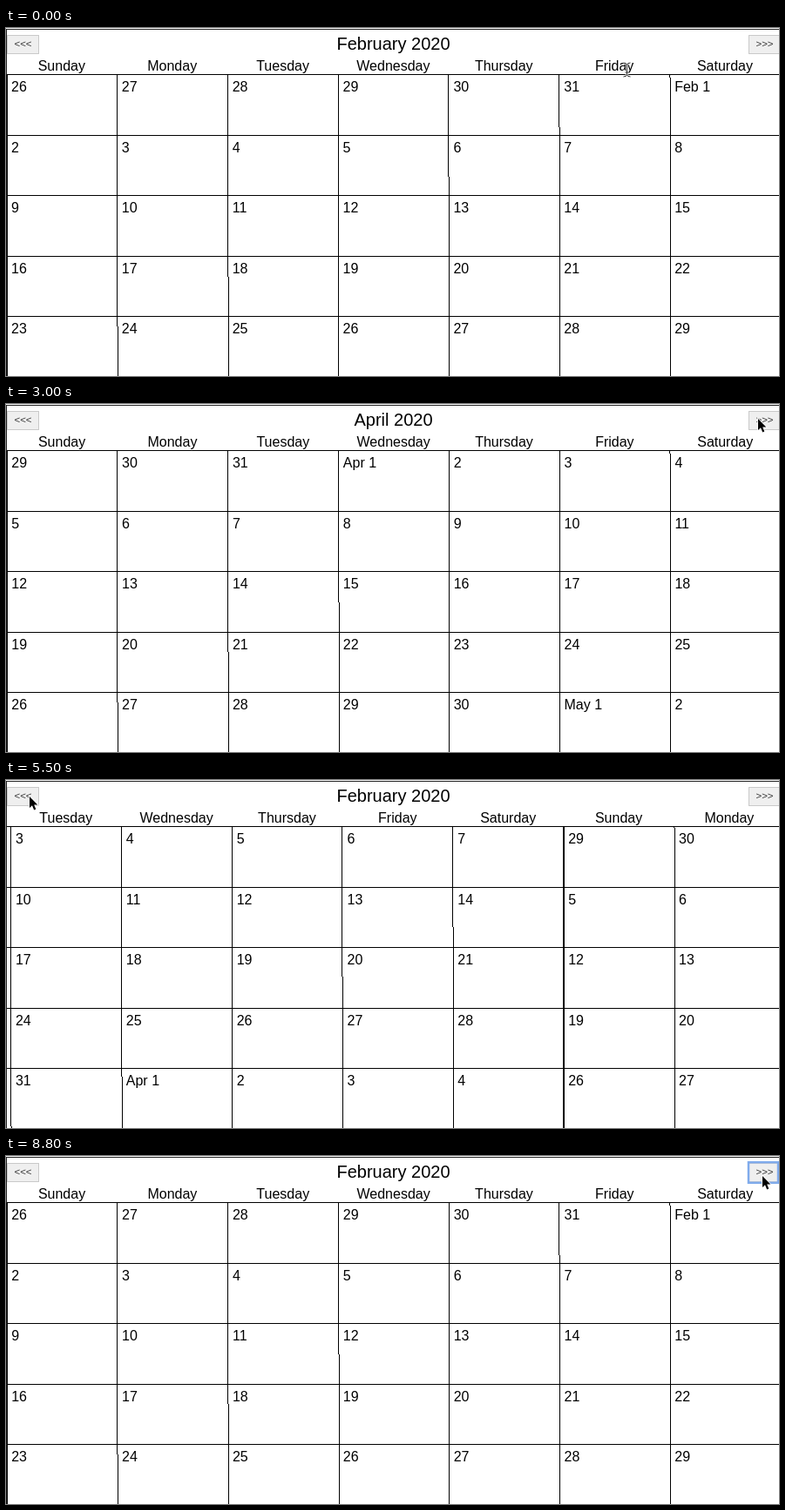
These frames come from a looping animation (887 by 400 pixels, 8900 ms). An HTML page with a canvas:

```html
<!DOCTYPE html>
<html lang="en">
<head>
<meta charset="utf-8">
<title>Sliding calendar</title>
<style>
  html, body { margin: 0; width: 100%; height: 100%; overflow: hidden; background: #fff; }
  canvas { display: block; }
</style>
</head>
<body>
<canvas id="stage" width="887" height="400"></canvas>
<script>
const W = 887, H = 400, LOOP = 8900, STEP = 100;
const PAGE = W + 1, COL = PAGE / 7, TOP = 53, GRID = 348;
const YEAR = 2020, FIRST_MONTH = 1, FOCUS_TIME = 8000;
const FONT = '"Liberation Sans", Arial, sans-serif';
const MONTHS = ['January', 'February', 'March', 'April', 'May', 'June'];
const DAYS = ['Sunday', 'Monday', 'Tuesday', 'Wednesday', 'Thursday', 'Friday', 'Saturday'];

// Button presses: three steps forward, a quick burst back, one step forward
const press = (time, direction) => ({ time, direction });
const burst = Array.from({ length: 4 }, (_, i) => press(5162.4 + 150 * i, -1));
const PRESSES = [press(1126, 1), press(2184, 1), press(3569, 1), ...burst, press(7965, 1)];

// Pointer glides between a few places; power shapes the slowing down, sag bends the path
const point = (x, y) => ({ x, y });
const HEADER = point(767, 29), NEXT = point(863, 17), BACK = point(27, 19), AWAY = point(1255, 1);
const GLIDES = [
  { start: 300, end: 1000, from: HEADER, to: NEXT, power: 2, sag: 0 },
  { start: 3600, end: 5000, from: NEXT, to: BACK, power: 1.48, sag: 63 },
  { start: 6900, end: 7100, from: BACK, to: AWAY, power: 1, sag: 0 },
  { start: 7600, end: 7800, from: point(884, 35), to: point(868, 23), power: 1, sag: 0 }
];

const ctx = document.getElementById('stage').getContext('2d');

// Critically damped spring from 0 to 1
function spring(ms) {
  const u = Math.max(0, ms) * 0.013;
  return 1 - (1 + u) * Math.exp(-u);
}

function text(string, x, y, size, align = 'left', color = '#000') {
  ctx.font = `${size}px ${FONT}`;
  ctx.textAlign = align;
  ctx.fillStyle = color;
  ctx.fillText(string, x, y);
}

function rect(x, y, w, h, color = '#000') {
  ctx.fillStyle = color;
  ctx.fillRect(x, y, w, h);
}

// Column lines shift slightly where they cross the stage's diagonal
function columnLine(x) {
  const split = Math.max(TOP, Math.min(H, Math.round(H * (1 - x / W))));
  rect(Math.floor(x + 0.5), TOP, 1, split - TOP);
  rect(Math.floor(x + 1.3), split, 1, H - split);
}

function drawMonth(month, left) {
  const first = new Date(YEAR, month, 1).getDay();
  const length = new Date(YEAR, month + 1, 0).getDate();
  const rows = Math.ceil((first + length) / 7);
  const rowTop = row => Math.round(TOP + row * GRID / rows);

  for (let row = 0; row < rows; row++) rect(Math.round(left), rowTop(row), PAGE, 1);
  rect(Math.round(left), TOP, 2, H - TOP);

  DAYS.forEach((name, col) => {
    const x = left + col * COL;
    if (col) columnLine(x);
    text(name, x + COL / 2 + 0.4, 49, 16, 'center');
    for (let row = 0; row < rows; row++) {
      const date = new Date(YEAR, month, 1 - first + row * 7 + col);
      const day = date.getDate();
      const label = day === 1 ? `${MONTHS[date.getMonth()].slice(0, 3)} 1` : day;
      text(label, x + 6, rowTop(row) + 20, 16);
    }
  });
}

function drawButton(x, label, focused) {
  rect(x, 8, 37, 22, '#c9c9c9');
  rect(x + 1, 9, 35, 20, '#efefef');
  text(label, x + 18.5, 22, 11.5, 'center', '#333');
  if (focused) {
    ctx.strokeStyle = '#80abec';
    ctx.lineWidth = 2.5;
    ctx.strokeRect(x, 7.2, W - x - 1, 23.6);
  }
}

function drawArrow({ x, y }) {
  ctx.save();
  ctx.translate(x, y);
  const arrow = new Path2D('M0 0V13L3 10.3L5.2 15.5L7.3 14.6L5.2 9.6H9.3Z');
  ctx.lineWidth = 1.6;
  ctx.strokeStyle = '#fff';
  ctx.stroke(arrow);
  ctx.fillStyle = '#000';
  ctx.fill(arrow);
  ctx.restore();
}

function drawTextCursor({ x, y }) {
  ctx.save();
  ctx.translate(x, y);
  const beam = new Path2D('M-4-8Q0-8 0-5Q0-8 4-8M-4 8Q0 8 0 5Q0 8 4 8M0-6V6M-2 3H2');
  for (const [color, width] of [['#fff', 2.5], ['#333', 1]]) {
    ctx.strokeStyle = color;
    ctx.lineWidth = width;
    ctx.stroke(beam);
  }
  ctx.restore();
}

function pointerAt(t) {
  const glide = GLIDES.findLast(({ start }) => start < t);
  if (!glide) return HEADER;
  const { start, end, from, to, power, sag } = glide;
  const p = 1 - (1 - Math.min(1, (t - start) / (end - start))) ** power;
  return point(
    from.x + (to.x - from.x) * p,
    from.y + (to.y - from.y) * p + sag * Math.sin(Math.PI * p)
  );
}

function draw(t) {
  let view = FIRST_MONTH, current = FIRST_MONTH;
  for (const { time, direction } of PRESSES) {
    view += direction * spring(t - time);
    if (t >= time) current += direction;
  }

  rect(0, 0, W, H, '#fff');
  MONTHS.forEach((_, month) => {
    if (Math.abs(month - view) < 1) drawMonth(month, (month - view) * PAGE);
  });
  rect(0, 1, W, 1, '#222');
  rect(0, 1, 1, H, '#222');
  text(`${MONTHS[current]} ${YEAR}`, 444.5, 25, 20, 'center');
  drawButton(1, '<<<');
  drawButton(852, '>>>', t >= FOCUS_TIME);

  if (t < 200) drawTextCursor(point(712.5 + 0.28 * t, 48 + 0.04 * t));
  else drawArrow(pointerAt(t));
}

function tick() {
  const t = performance.now() % LOOP;
  draw(Math.floor(t / STEP) * STEP);
  requestAnimationFrame(tick);
}
tick();
</script>
</body>
</html>
```
